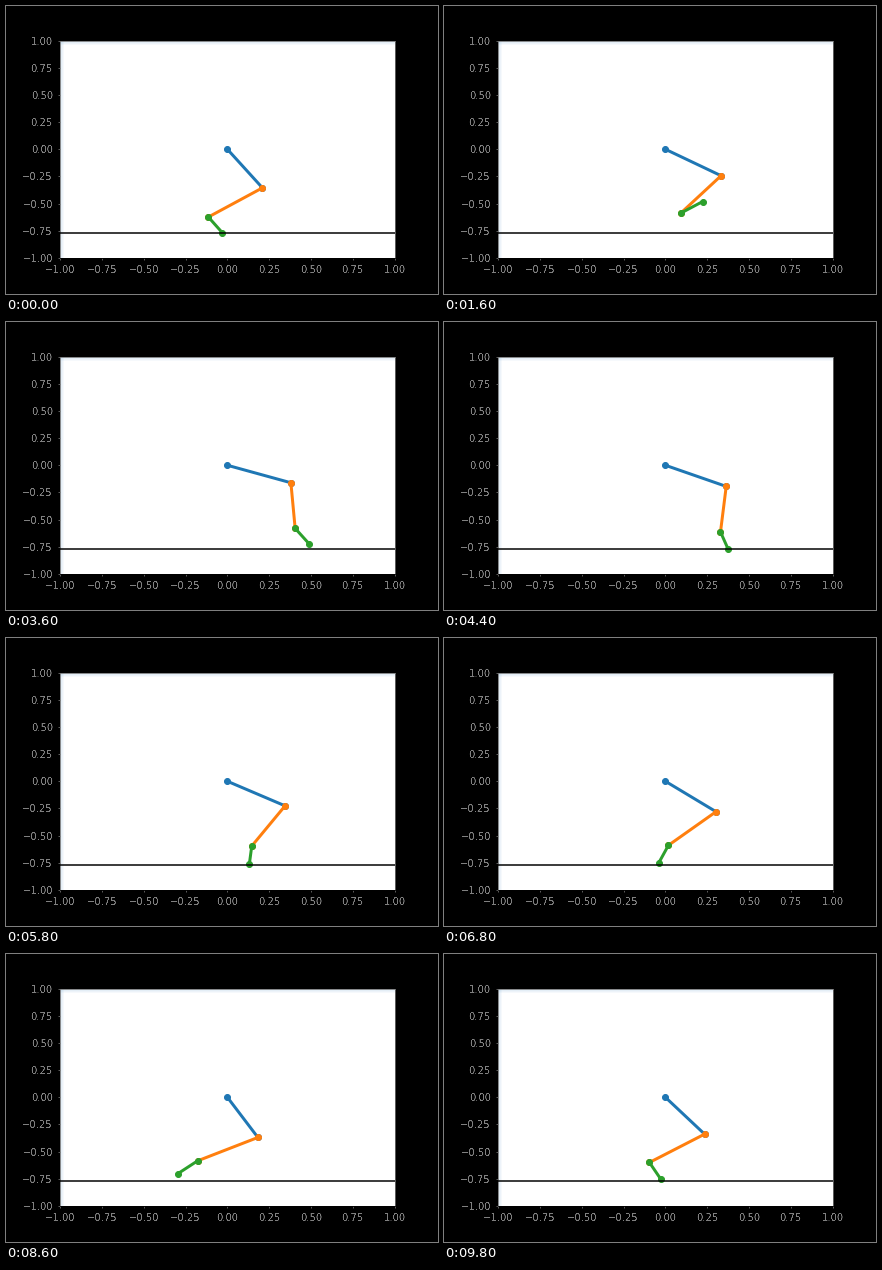
Recreate the animation shown at these times as a matplotlib script. Size 432x288 px, loop 10 s.

```python
import numpy as np
import matplotlib.pyplot as plt
from matplotlib.animation import FuncAnimation

STEP = 200
FRAMES = 50
LENGTHS = np.array([0.412, 0.42, 0.168])
GROUND = -0.77


def ease(t, centre, width):
    """Smooth step from 0 to 1 around a centre time (s)."""
    return 0.5 * (1 + np.tanh((t - centre) / width))


def thigh(t):
    swing = 39.5 * ease(t, 1.53, 0.38)
    push = 9.5 * ease(t, 3.9, 0.7) + 42 * ease(t, 7.3, 1.3)
    recover = 18 * ease(t, 9.2, 0.7)
    return 30.5 + swing - push + recover


def shin(t):
    swing = 34 * ease(t, 1.45, 0.9) + 41 * ease(t, 2.94, 0.5)
    push = 84 * ease(t, 5.2, 2.4) + 5 * ease(t, 7.7, 0.5)
    recover = 12.6 * ease(t, 9.2, 0.5)
    return -51 + swing - push + recover


def foot(t):
    flick = 123 * ease(t, 1.37, 0.15) - 120 * ease(t, 2.4, 0.9)
    push = 80 * ease(t, 5.8, 2.6) + 14 * ease(t, 8.2, 0.25)
    recover = 90 * ease(t, 9.3, 0.5)
    return 32 + flick - push + recover


def joints_at(t):
    """Hip, knee, ankle and toe; angles are measured from straight down."""
    angles = np.radians([thigh(t), shin(t), foot(t)])
    x = np.append(0, np.cumsum(LENGTHS * np.sin(angles)))
    y = np.append(0, -np.cumsum(LENGTHS * np.cos(angles)))
    return x, y


def crisp(image, dpi):
    """Thin the glyphs by dropping their faint edge pixels."""
    out = image.copy()
    out[..., 3] = np.clip((image[..., 3] - 0.3) / 0.3, 0, 1)
    return out, 0, 0


plt.rcParams["font.family"] = "DejaVu Sans"
fig = plt.figure(figsize=(6, 4), dpi=72, facecolor="black")
fig.subplots_adjust(left=0.125, right=0.9, bottom=0.125, top=0.88)
ax = fig.add_subplot(facecolor="white")
ax.set(xlim=(-1, 1), ylim=(-1, 1))
ticks = np.linspace(-1, 1, 9)
ax.set_xticks(ticks)
ax.set_yticks(ticks)
ax.tick_params(color="0.45", length=2, pad=5, labelsize=10, labelcolor="0.5")
for label in ax.get_xticklabels() + ax.get_yticklabels():
    label.set_agg_filter(crisp)
for side in ("top", "left", "right"):
    ax.spines[side].set_color("0.45")

# faint blue fade inside the top and left edges
for k in range(1, 5):
    shade = dict(color="C0", alpha=0.04, lw=0, zorder=0.5)
    ax.axhspan(1 - k * 2 / 217, 1, **shade)
    ax.axvspan(-1, -1 + k * 2 / 335, **shade)

ax.axhline(GROUND, color="black", lw=1.5, zorder=3)
bones = [ax.plot([], [], "o-", lw=3, ms=6, color=c)[0]
         for c in ("C0", "C1", "C2")]


def draw(frame):
    # the opening pose is held for two frames
    x, y = joints_at(max(frame, 1) * STEP / 1000)
    for i, bone in enumerate(bones):
        bone.set_data(x[i:i + 2], y[i:i + 2])
    return bones


anim = FuncAnimation(fig, draw, frames=FRAMES, interval=STEP,
                     repeat=True, repeat_delay=0)
plt.show()
```
